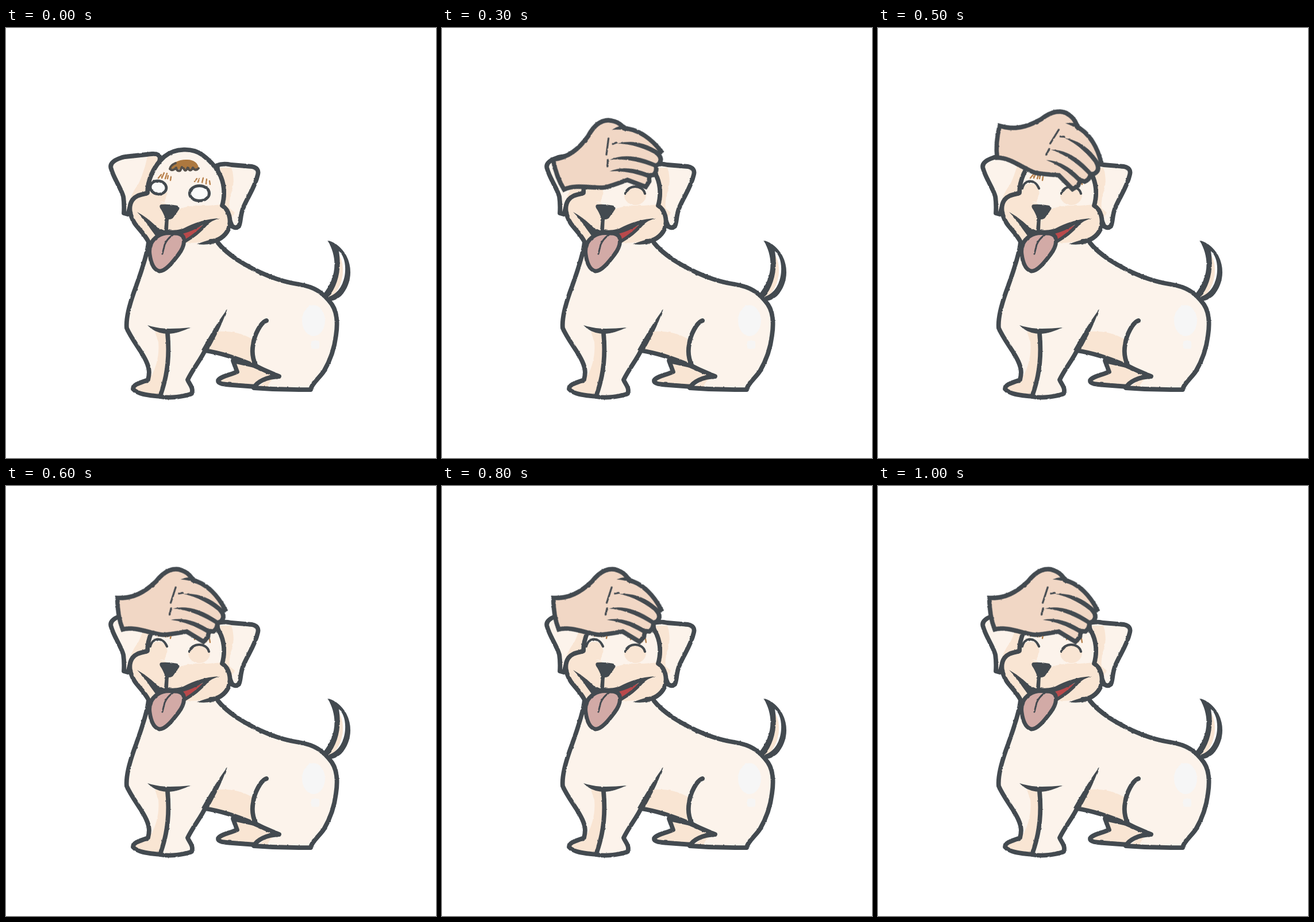
Write an HTML page that moves like this. It is 748 px wide and 748 px high and loops after 1100 ms.

```html
<!DOCTYPE html>
<html lang="en">
<head>
<meta charset="utf-8">
<title>Petting a dog</title>
<style>
  html, body { margin: 0; width: 100%; height: 100%; overflow: hidden; background: #fff; }
  svg { display: block; width: 100vw; height: 100vh; }
  .line { fill: none; stroke: #434a50; stroke-width: 7.8; stroke-linecap: round; stroke-linejoin: round; }
  .thin { stroke-width: 4.2; }
  .cream { fill: #fcf3eb; }
  .peach { fill: #f9e5d3; }
  .dark { fill: #434a50; }
  .white { fill: #fafafa; }
  .skin { fill: #f1d7c5; }
  .brow { fill: none; stroke: #b9824d; stroke-width: 2.4; stroke-linecap: round; }
</style>
</head>
<body>
<svg viewBox="0 0 748 748">
  <defs>
    <filter id="rough" x="-5%" y="-5%" width="110%" height="110%" color-interpolation-filters="sRGB">
      <feTurbulence type="fractalNoise" baseFrequency=".15" numOctaves="2" seed="4"/>
      <feDisplacementMap in="SourceGraphic" scale="2.2" xChannelSelector="R" yChannelSelector="G"/>
    </filter>
    <clipPath id="headClip">
      <path id="headShape" d="M246 289C246 266 256 241 275 224C294 208 325 208 342 221C362 236 377 256 379 280Q380 296 376 309C388 316 393 335 387 350C380 366 359 373 335 376L249 372C242 358 231 350 224 340C214 324 213 309 220 299C227 290 237 290 246 289Z"/>
    </clipPath>
  </defs>

  <g filter="url(#rough)">
    <!-- tail -->
    <path class="peach" d="M574 386C586 400 590 422 582 445Q575 463 562 471L556 465C571 448 580 425 574 386Z"/>
    <path class="dark" d="M559 369Q580 375 592 396C605 421 599 449 583 466Q573 475 561 475L562 467C579 462 589 443 590 423C591 406 586 394 579 388C584 419 578 448 560 469L551 464C574 436 579 402 559 369Z"/>

    <!-- far hind foot -->
    <path class="line peach" d="M395 579L402 598C389 604 373 606 369 613C368 619 380 620 394 621L434 624L475 606L431 587Z"/>

    <!-- body -->
    <path class="cream" d="M248 368C246 393 235 425 226 450C217 474 208 502 210 522C219 543 237 563 244 580C251 595 249 604 247 612C235 617 221 619 221 628C230 638 250 639 268 641C284 645 311 641 323 636C327 626 318 618 316 612C325 593 340 575 346 561Q385 567 431 587L475 606C453 607 437 615 431 626Q480 630 530 628C532 618 545 609 553 597C563 580 571 560 574 535C578 509 575 493 567 481C551 459 535 450 510 446C470 440 435 424 402 403Q379 387 369 372Z"/>
    <path class="peach" d="M368 528Q402 526 428 541L427 560L433 585Q395 567 349 561ZM259 528L279 530L280 590L268 638Q238 637 222 629Q229 617 248 613C263 592 267 565 265 546ZM455 610L468 608Q455 617 456 625L440 624Z"/>
    <ellipse cx="535" cy="509" rx="20" ry="27" fill="#f6f6f6"/>
    <rect x="531" y="544" width="14" height="14" rx="3" fill="#f6f5f4"/>
    <path class="line" d="M248 372C246 393 235 425 226 450C217 474 208 502 210 522C219 543 237 563 244 580C251 595 249 604 247 612C235 617 221 619 221 628C230 638 250 639 268 641C284 645 311 641 323 636C327 626 318 618 316 612C325 593 340 575 346 561Q385 567 431 587L475 606C453 607 437 615 431 626Q480 630 530 629C532 618 545 609 553 597C563 580 571 560 574 535C578 509 575 493 567 481C551 459 535 450 510 446C470 440 435 424 402 403Q379 387 369 374M281 531C284 562 281 590 278 605Q275 620 269 638M453 509C443 512 432 534 430 550Q426 570 435 588Q452 597 475 606"/>
    <path class="dark" d="M385 489Q373 524 350 564L340 560Q366 514 385 489ZM246 517Q264 523 285 523Q302 523 321 521Q300 531 284 532Q260 532 246 517Z"/>

    <!-- ears -->
    <path class="line cream" d="M268 226Q266 218 254 219L207 224C190 228 179 235 183 245C188 263 200 278 204 293Q206 306 205 322L212 324L217 306L246 287Z"/>
    <path class="peach" d="M246 224L261 223Q266 226 262 234Q247 256 245 286L221 296L212 312Q215 292 231 270Q241 248 246 224Z"/>
    <path class="line cream" d="M367 239Q377 235 392 238L428 241Q441 244 438 255C433 278 420 294 413 312C407 326 409 337 405 345Q399 350 393 344L379 309Z"/>
    <path class="peach" d="M372 243L392 243Q399 263 393 283Q387 302 389 314L398 321L392 330L380 309L380 280Z"/>

    <!-- head -->
    <use href="#headShape" class="cream"/>
    <g clip-path="url(#headClip)" class="peach">
      <path d="M212 288L248 288Q259 300 276 305L294 317Q319 307 350 309L378 307L400 340L380 364Q350 374 310 374L242 376L210 340Z"/>
      <path d="M249 284Q265 296 281 285L276 302Q259 304 246 290Z"/>
    </g>
    <path class="line" d="M248 372C240 357 231 350 224 340C214 324 213 309 220 299C227 290 237 290 246 287C246 266 256 241 275 224C294 208 325 208 342 221C362 236 377 256 379 280Q380 296 376 309C388 316 393 335 387 350C381 363 368 371 356 371"/>
    <path class="dark" d="M358 368Q347 370 332 376Q346 378 359 375Z"/>

    <!-- mouth -->
    <path d="M254 348L272 355L264 362ZM304 357Q332 350 355 336Q336 357 311 370Z" fill="#b9494b"/>
    <path class="dark" d="M228 320Q248 331 263 347L275 352L277 330L283 330L282 351Q294 353 308 349Q340 332 372 331Q357 335 351 342Q335 361 312 374L311 368Q332 355 343 342Q326 353 307 358L272 358L262 364L251 349Q240 332 228 320Z"/>
    <path class="line" style="fill:#d2aaa6;stroke-width:7" d="M264 362C253 369 248 381 250 394C252 408 257 421 267 423C278 423 290 407 300 394C307 385 311 374 309 365Q306 356 290 357Q275 355 264 362Z"/>
    <path class="line" style="stroke-width:3" d="M290 360Q280 367 276 377L272 393"/>
    <path class="dark" d="M270 307Q284 306 298 309Q304 312 300 317L290 331Q284 335 277 331Q273 320 268 313Q266 308 270 307Z"/>

    <!-- forehead tuft and brows -->
    <path d="M285 245C288 235 300 229 313 229C326 228 334 235 335 243Q332 250 326 242Q324 252 316 243Q312 252 305 242Q299 250 295 243Q290 250 285 245Z" fill="#ad783f"/>
    <path class="line" style="stroke:#55504b;stroke-width:4" d="M295 235Q286 239 285 245Q290 250 296 243Q297 250 303 248L306 242M309 244Q312 252 316 243Q321 252 325 243Q330 250 335 244"/>
    <path class="brow" d="M265 261L270 255M271 261L275 252M277 262L280 253M281 262L282 257M286 265L287 259M328 267L332 262M334 268L337 261M341 269L343 261M348 271L349 263M355 272L354 266"/>

    <g id="openEyes" class="line">
      <ellipse class="white" cx="265" cy="277.500" rx="14" ry="11.500" transform="rotate(8 265 277)" style="stroke-width:4.800"/>
      <ellipse class="white" cx="336.500" cy="287.500" rx="17" ry="13" style="stroke-width:5.200"/>
    </g>
    <g id="closedEyes">
      <ellipse class="peach" cx="265" cy="283" rx="15" ry="12"/>
      <ellipse class="peach" cx="336" cy="291" rx="19" ry="17"/>
      <path class="line thin" d="M251 279C255 263 273 262 280 279M319 288C323 272 349 272 353 288"/>
    </g>
  </g>

  <g id="hand"><g transform="translate(-67 -266)" filter="url(#rough)">
    <path class="line skin" style="stroke-linejoin:miter" d="M51 243C75 232 88 213 97 186C101 163 112 149 128 148Q141 146 153 154C178 148 205 158 226 173L222 179Q233 184 229 195L225 200Q230 207 226 216L219 219L222 229L219 240L185 238C177 244 165 254 152 262C132 271 102 271 85 287Q66 271 51 243Z"/>
    <path class="dark" d="M133 163Q145 148 160 149L160 157Q149 156 133 163ZM149 183Q181 162 225 175L224 182Q183 173 149 183ZM145 214Q172 189 227 196L226 203Q178 199 145 214ZM151 233Q177 211 224 217L224 224Q180 221 151 233Z"/>
    <path class="line" style="stroke-width:3.200" d="M132 179L137 207M142 215L145 226M142 186L147 182"/>
  </g></g>
</svg>
<script>
  const STEP = 100;
  const LOOP = 1100;
  const pose = (x, y, angle, closed = true) => ({ x, y, angle, closed });

  // Wrist position and rotation of the hand
  const reach = [pose(38, 279, -4, false), pose(67, 266, 0, false)];
  const low = pose(201.5, 255.5, 17.5);
  const middle = pose(197, 222.5, 28);
  const high = pose(208, 198, 42);
  const poses = [null, ...reach, low, middle, high, middle, low, middle, high, middle];

  const hand = document.getElementById('hand');
  const openEyes = document.getElementById('openEyes');
  const closedEyes = document.getElementById('closedEyes');
  const show = (element, visible) => element.setAttribute('visibility', visible ? 'visible' : 'hidden');

  function draw(time) {
    const current = poses[Math.floor((time % LOOP) / STEP)];
    const closed = Boolean(current && current.closed);
    show(openEyes, !closed);
    show(closedEyes, closed);
    show(hand, current);
    if (current) {
      hand.setAttribute('transform', `translate(${current.x} ${current.y}) rotate(${current.angle})`);
    }
  }

  const start = performance.now();
  function tick() {
    draw(performance.now() - start);
    requestAnimationFrame(tick);
  }
  tick();
</script>
</body>
</html>
```
